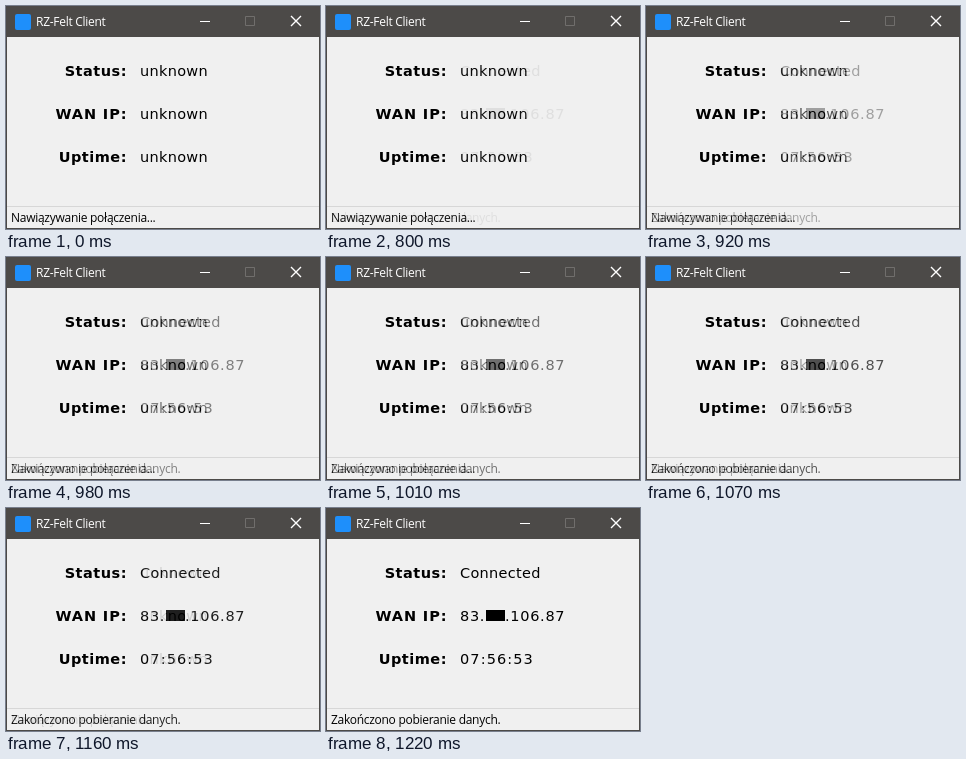
Recreate the animation shown at these times as an HTML page. Size 314 px wide and 223 px high, loop 2960 ms.

```html
<!DOCTYPE html>
<html lang="pl">
<head>
<meta charset="utf-8">
<title>Client</title>
<style>
  html, body { margin: 0; width: 100%; height: 100%; overflow: hidden; background: #f0f0f0; }
  svg { display: block; width: 314px; height: 223px; }
  .value, .label { font: 14.5px "DejaVu Sans", sans-serif; letter-spacing: .3px; }
  .label { font-weight: bold; text-anchor: end; letter-spacing: .5px; }
  .small { font: 12px "Open Sans", sans-serif; letter-spacing: -.28px; }
  .wide { letter-spacing: .9px; }
  .ip { letter-spacing: .7px; }
  .uptime { letter-spacing: 1.1px; }
  .panel { fill: #f0f0f0; }
</style>
</head>
<body>
<svg viewBox="0 0 314 223">
  <rect width="314" height="223" fill="#4c4a48"/>
  <rect class="panel" x="1" y="31" width="312" height="191"/>

  <!-- Title bar -->
  <rect x="9" y="8" width="16" height="16" rx="2" fill="#1e8ffb"/>
  <text class="small" x="30" y="20" fill="#fff">RZ-Felt Client</text>
  <g fill="none" stroke="#fff">
    <path d="M194 15.5h10"/>
    <path d="M239.5 10.5h9v9h-9z" stroke="#706e6c"/>
    <path d="M285 10l10 10m0-10l-10 10" stroke-width="1.4"/>
  </g>

  <g class="label">
    <text x="121" y="70">Status:</text>
    <text class="wide" x="121.4" y="113">WAN IP:</text>
    <text x="121" y="156">Uptime:</text>
  </g>
  <path d="M1 200.5h312" stroke="#d7d7d7"/>

  <g class="value">
    <text x="134" y="70">unknown</text>
    <text x="134" y="113">unknown</text>
    <text x="134" y="156">unknown</text>
    <text class="small" x="5" y="216">Nawiązywanie połączenia...</text>
  </g>

  <!-- Opaque layer, so its opacity gives a true cross-fade -->
  <g id="connected" class="value" opacity="0">
    <rect class="panel" x="130" y="50" width="180" height="120"/>
    <rect class="panel" x="1" y="201" width="312" height="21"/>
    <text x="134" y="70">Connected</text>
    <text class="ip" x="134" y="113">83.</text>
    <rect x="160" y="102" width="19" height="11"/>
    <text class="ip" x="179" y="113">.106.87</text>
    <text class="uptime" x="134" y="156">07:56:53</text>
    <text class="small" x="5" y="216">Zakończono pobieranie danych.</text>
  </g>
</svg>
<script>
  const LOOP = 2960, FADE_START = 800, STEPS = 15, STEP = 30;

  // Each step holds its opacity until the next one begins.
  const fade = Array.from({ length: STEPS }, (_, i) => ({
    opacity: (i + 1) / STEPS,
    offset: (FADE_START + i * STEP) / LOOP
  }));
  const frames = [{ opacity: 0, offset: 0 }, ...fade, { opacity: 1, offset: 1 }]
    .map(frame => ({ ...frame, easing: 'steps(1, end)' }));

  document.getElementById('connected').animate(frames, { duration: LOOP, iterations: Infinity });
</script>
</body>
</html>
```
